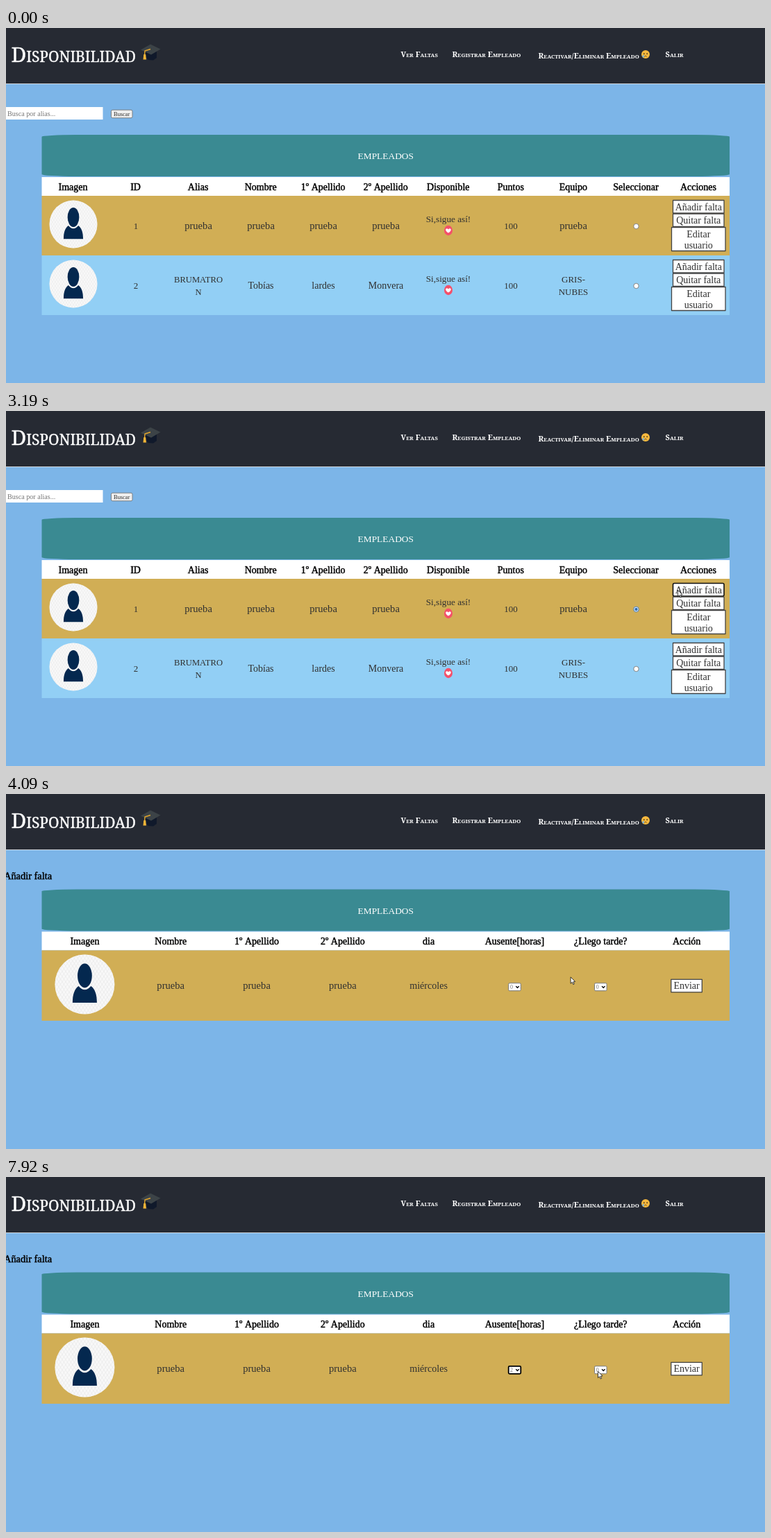
An HTML page with a canvas for the animation above (8 s loop, 1093x512 px).

```html
<!DOCTYPE html>
<html lang="es">
<head>
<meta charset="utf-8">
<title>Disponibilidad</title>
<style>
html, body { margin: 0; width: 100%; height: 100%; overflow: hidden; background: #7cb5e8; }
canvas { display: block; width: 1093px; height: 512px; }
</style>
</head>
<body>
<canvas id="stage"></canvas>
<script>
const W = 1093, H = 512, LOOP = 8000;
const PAGE_SWITCH = 3620, NAV_TIME = 430;
const LIST_OPEN = 5400, LIST_CLOSE = 7200, OPTION_H = 8.7;
const LEFT = 51.5, RIGHT = 1042;
const BODY = '"Liberation Serif", serif', SLAB = '"Noto Serif", serif';
const INK = '#303030', NAVY = '#04284f', GOLD = '#d1ae55';

const canvas = document.getElementById('stage');
const ctx = canvas.getContext('2d');
const dpr = window.devicePixelRatio || 1;
canvas.width = W * dpr;
canvas.height = H * dpr;

// Pointer keys: time, x, y
const path = [
  [190, 1057, 497], [580, 1002, 390], [970, 945, 296], [1160, 934, 291],
  [1610, 902, 283], [1860, 902, 283], [1930, 904.5, 286], [2400, 904.5, 286],
  [2820, 967, 258], [3890, 967, 258], [4390, 583, 272], [4640, 583, 272],
  [4800, 660, 277], [4970, 746, 271], [5110, 746, 269.5], [5400, 733, 277],
  [5700, 733, 277], [6390, 733, 327], [6720, 733, 327], [7020, 733, 307],
  [7240, 733, 307], [7920, 852, 280]
];

const lerp = (a, b, p) => a + (b - a) * p;

// CSS "ease": cubic-bezier(.25, .1, .25, 1)
function ease(t) {
  if (t <= 0) return 0;
  if (t >= 1) return 1;
  const bez = (a, b, s) => 3 * a * s * (1 - s) ** 2 + 3 * b * s * s * (1 - s) + s ** 3;
  let lo = 0, hi = 1;
  for (let i = 0; i < 20; i++) {
    const mid = (lo + hi) / 2;
    if (bez(.25, .25, mid) < t) lo = mid; else hi = mid;
  }
  return bez(.1, 1, lo);
}

function pointerAt(t) {
  if (t < path[0][0]) return null;
  let i = 0;
  while (i < path.length - 1 && path[i + 1][0] <= t) i++;
  const a = path[i], b = path[i + 1] || a;
  const p = b === a ? 0 : (t - a[0]) / (b[0] - a[0]);
  return { x: lerp(a[1], b[1], p), y: lerp(a[2], b[2], p) };
}

function rect(x, y, w, h, color) {
  ctx.fillStyle = color;
  ctx.fillRect(x, y, w, h);
}

function box(x, y, w, h, r, fill, stroke, line = 1) {
  ctx.beginPath();
  ctx.roundRect(x, y, w, h, r);
  ctx.fillStyle = fill;
  ctx.fill();
  if (!stroke) return;
  ctx.lineWidth = line;
  ctx.strokeStyle = stroke;
  ctx.stroke();
}

function ellipse(x, y, rx, ry, color) {
  ctx.beginPath();
  ctx.ellipse(x, y, rx, ry, 0, 0, Math.PI * 2);
  ctx.fillStyle = color;
  ctx.fill();
}

function poly(points, color) {
  ctx.beginPath();
  points.forEach(([x, y]) => ctx.lineTo(x, y));
  ctx.closePath();
  ctx.fillStyle = color;
  ctx.fill();
}

function text(str, x, y, size = 14, color = INK, align = 'center') {
  ctx.font = `${size}px ${BODY}`;
  ctx.textAlign = align;
  ctx.fillStyle = color;
  ctx.fillText(str, x, y);
}

function mediumText(str, x, y, size = 14, align = 'center') {
  text(str, x, y, size, '#000', align);
  ctx.lineWidth = .45;
  ctx.strokeStyle = '#000';
  ctx.strokeText(str, x, y);
}

// Small capitals; returns the end of the line
function smallCaps(str, x, y, size, weight, color, line = 0) {
  ctx.textAlign = 'left';
  ctx.fillStyle = ctx.strokeStyle = color;
  for (const run of str.match(/[A-Z /]+|[^A-Z /]+/g)) {
    const big = /[A-Z /]/.test(run[0]);
    const caps = run.toUpperCase();
    ctx.font = `${weight} ${big ? size : size * .7}px ${SLAB}`;
    ctx.fillText(caps, x, y);
    if (line) {
      ctx.lineWidth = line;
      ctx.strokeText(caps, x, y);
    }
    x += ctx.measureText(caps).width;
  }
  return x;
}

function gradCap() {
  poly([[201, 34], [217, 34], [217, 43], [212, 46.5], [205, 46], [201, 42]], '#10192b');
  poly([[194, 31.5], [208, 23.5], [222.5, 30.5], [209, 38.5]], '#3c4347');
  ctx.beginPath();
  ctx.moveTo(208, 30.5);
  ctx.lineTo(200, 33);
  ctx.lineTo(199.5, 40);
  ctx.strokeStyle = '#e3a62c';
  ctx.lineWidth = 1.4;
  ctx.stroke();
  poly([[198.3, 38], [201.2, 38], [202, 45.5], [197.5, 45.5]], '#f0b437');
}

function sadFace(x, y) {
  ellipse(x, y, 6, 6, '#f7b93e');
  ellipse(x - 2.2, y - .8, .8, 1.1, '#4a3520');
  ellipse(x + 2.2, y - .8, .8, 1.1, '#4a3520');
  ctx.beginPath();
  ctx.arc(x, y + 4.2, 1.9, Math.PI * 1.15, Math.PI * 1.85);
  ctx.strokeStyle = '#4a3520';
  ctx.lineWidth = .9;
  ctx.stroke();
  ellipse(x - 3.2, y + 2.8, 1.2, 1.7, '#6cb4e8');
}

function header(height, p) {
  rect(0, 0, W, height, '#262a33');
  rect(0, height, W, 1, '#cfd6dd');
  smallCaps('Disponibilidad', 7.5, 49, 29.9, 300, '#fff', .4);
  gradCap();

  const size = lerp(9.5, 11.1, p);
  const color = `rgb(${255 * p}, ${255 * p}, ${lerp(238, 255, p)})`;
  const items = [
    ['Ver Faltas', 695, 568.5, 8.5, 42],
    ['Registrar Empleado', 739, 642.5, 8.5, 42],
    ['Reactivar/Eliminar Empleado', 824, 766.5, 10.5, 43.5],
    ['Salir', 965, 949.5, 8.5, 42]
  ];
  for (const [label, x0, x1, y0, y1] of items) {
    const x = lerp(x0, x1, p), y = lerp(y0, y1, p);
    const end = smallCaps(label, x, y, size, 700, color);
    if (p < .3) rect(x, y + 1, end - x, .8, color);
  }
  sadFace(lerp(958, 921, p), lerp(5.5, 38, p));
}

function tableHead(y, labels) {
  const w = RIGHT - LEFT, col = w / labels.length;
  ctx.beginPath();
  ctx.roundRect(LEFT, y, w, 60, { x: w * .05, y: 3 });
  ctx.fillStyle = '#3a8a92';
  ctx.fill();
  text('EMPLEADOS', LEFT + w / 2, y + 35, 13.4, '#fff');
  rect(LEFT, y + 61, w, 27, '#fff');
  labels.forEach((s, i) => mediumText(s, LEFT + col * (i + .5), y + 79.5));
}

function avatar(x, y, r) {
  ctx.save();
  ctx.translate(x, y);
  ctx.scale(r / 43, r / 43);
  ellipse(0, 0, 43, 43, '#f8f8f8');
  ctx.beginPath();
  ctx.arc(0, 0, 43, 0, Math.PI * 2);
  ctx.clip();
  ctx.beginPath();
  for (let i = -90; i <= 90; i += 5) {
    ctx.moveTo(i - 30, -45);
    ctx.lineTo(i + 30, 45);
    ctx.moveTo(i + 30, -45);
    ctx.lineTo(i - 30, 45);
  }
  ctx.strokeStyle = '#e9e9e9';
  ctx.lineWidth = .7;
  ctx.stroke();
  ctx.beginPath();
  ctx.moveTo(-17.5, 26.5);
  ctx.bezierCurveTo(-17.5, 15, -15, 7, -9, 2.5);
  ctx.quadraticCurveTo(0, 13, 9, 2.5);
  ctx.bezierCurveTo(15, 7, 17.5, 15, 17.5, 26.5);
  ctx.closePath();
  ctx.fillStyle = NAVY;
  ctx.fill();
  ellipse(0, -12.5, 10.4, 17.5, NAVY);
  ctx.restore();
}

function heartBadge(x, y) {
  ellipse(x, y, 6, 7.2, '#f4506a');
  ctx.beginPath();
  ctx.moveTo(x, y + 3.6);
  ctx.bezierCurveTo(x - 7, y - 1, x - 2.5, y - 5, x, y - 1.6);
  ctx.bezierCurveTo(x + 2.5, y - 5, x + 7, y - 1, x, y + 3.6);
  ctx.fillStyle = '#fff';
  ctx.fill();
}

function button(x, y, w, h, lines, focused) {
  box(x, y, w, h, focused ? 2 : 0, '#fff', focused ? '#101010' : '#444', focused ? 1.6 : 1.3);
  lines.forEach((s, i) => text(s, x + w / 2, y + 14 + i * 16));
}

function radio(x, y, checked) {
  box(x - 3.7, y - 3.7, 7.4, 7.4, 3.7, '#fff', checked ? '#2f6fb5' : '#767676', .9);
  if (checked) ellipse(x, y, 2.2, 2.2, '#2f6fb5');
}

function employeeRow(y, color, cells, checked, focused) {
  rect(LEFT, y, RIGHT - LEFT, 86, color);
  avatar(97, y + 41, 34.5);
  cells.forEach(([col, str, size]) => {
    const lines = str.split('\n'), x = 97 + col * 90;
    const base = y + (lines.length > 1 ? 39 : 48);
    lines.forEach((s, i) => text(s, x, base + i * 18.3, size));
  });
  text('Si,sigue así!', 637, y + 38, 13.2);
  heartBadge(637, y + 50);
  radio(907.5, y + 44, checked);
  button(960.5, y + 6.5, 73.5, 18.5, ['Añadir falta'], focused);
  button(960.5, y + 26, 73.5, 18.5, ['Quitar falta']);
  button(958.5, y + 45.5, 77.5, 34, ['Editar', 'usuario']);
}

function listPage(t) {
  header(80, 1);
  rect(0, 114, 139.5, 18, '#fff');
  text('Busca por alias...', 2, 127, 10.1, '#757575', 'left');
  box(151.5, 118.2, 30.5, 11.5, 2, '#efefef', '#767676', .9);
  text('Buscar', 166.7, 126.8, 8.4);
  tableHead(154, ['Imagen', 'ID', 'Alias', 'Nombre', '1º Apellido', '2º Apellido',
    'Disponible', 'Puntos', 'Equipo', 'Seleccionar', 'Acciones']);
  const trial = [2, 3, 4, 5, 8].map(col => [col, 'prueba', 14.6]);
  employeeRow(242, GOLD, [[1, '1', 13], ...trial, [7, '100', 13]], t >= 2110, t >= 3070);
  employeeRow(328, '#92cff5', [
    [1, '2', 13], [2, 'BRUMATRO\nN', 12.6], [3, 'Tobías', 14], [4, 'lardes', 14],
    [5, 'Monvera', 14], [7, '100', 13], [8, 'GRIS-\nNUBES', 13]
  ]);
}

function select(x, y, value, focused) {
  box(x - 8.8, y - 5.5, 17.6, 11, 1.5, '#fff', focused ? '#000' : '#767676', focused ? 1.8 : 1);
  text(value, x - 4.5, y + 2.8, 8, '#777');
  ctx.beginPath();
  ctx.moveTo(x + 1.8, y - 1.2);
  ctx.lineTo(x + 4, y + 1.2);
  ctx.lineTo(x + 6.2, y - 1.2);
  ctx.strokeStyle = '#000';
  ctx.lineWidth = 1.4;
  ctx.stroke();
}

function optionList(pointer) {
  const x = 724, y = 285, n = 8;
  const hover = Math.max(0, Math.floor((pointer.y - y) / OPTION_H));
  rect(x, y, 18, n * OPTION_H, '#fff');
  for (let i = 0; i < n; i++) {
    const top = y + i * OPTION_H, on = i === hover;
    if (on) rect(x, top, 18, OPTION_H, '#1e70d0');
    text(i, x + 4, top + 7, 8, on ? '#fff' : '#333');
  }
  ctx.strokeStyle = '#767676';
  ctx.lineWidth = .8;
  ctx.strokeRect(x + .4, y + .4, 17.2, n * OPTION_H - .8);
}

function formPage(t, pointer) {
  const p = ease((t - PAGE_SWITCH) / NAV_TIME);
  const height = Math.max(54, 80 - 51 * (1 - p));
  header(height, p);
  ctx.save();
  ctx.translate(0, height - 80);
  mediumText('Añadir falta', -3, 123, 14.4, 'left');
  tableHead(137.5, ['Imagen', 'Nombre', '1º Apellido', '2º Apellido', 'dia',
    'Ausente[horas]', '¿Llego tarde?', 'Acción']);
  rect(LEFT, 225.5, RIGHT - LEFT, 101.5, GOLD);
  avatar(113.4, 274.5, 43);
  [237.2, 361, 484.8].forEach(x => text('prueba', x, 281, 14.6));
  text('miércoles', 608.6, 281, 14.1);
  select(732.5, 278.3, t >= LIST_CLOSE ? '2' : '0', t >= LIST_OPEN);
  select(856.3, 278.3, '0');
  button(957.8, 267.3, 44.5, 18.5, ['Enviar']);
  ctx.restore();
  if (t >= LIST_OPEN && t < LIST_CLOSE) optionList(pointer);
}

function drawPointer({ x, y }) {
  ctx.beginPath();
  [[0, 0], [0, 9.4], [2.2, 7.4], [3.7, 10.8], [5.2, 10.1], [3.7, 6.9], [6.6, 6.7]]
    .forEach(([dx, dy]) => ctx.lineTo(x + .5 + dx, y + .3 + dy));
  ctx.closePath();
  ctx.fillStyle = '#fff';
  ctx.fill();
  ctx.strokeStyle = '#111';
  ctx.lineWidth = .8;
  ctx.stroke();
}

function draw(t) {
  ctx.setTransform(dpr, 0, 0, dpr, 0, 0);
  ctx.lineJoin = 'round';
  rect(0, 0, W, H, '#7cb5e8');
  const pointer = pointerAt(t);
  if (t < PAGE_SWITCH) listPage(t); else formPage(t, pointer);
  if (pointer) drawPointer(pointer);
}

const start = performance.now();
function tick() {
  draw((performance.now() - start) % LOOP);
  requestAnimationFrame(tick);
}
tick();
</script>
</body>
</html>
```
